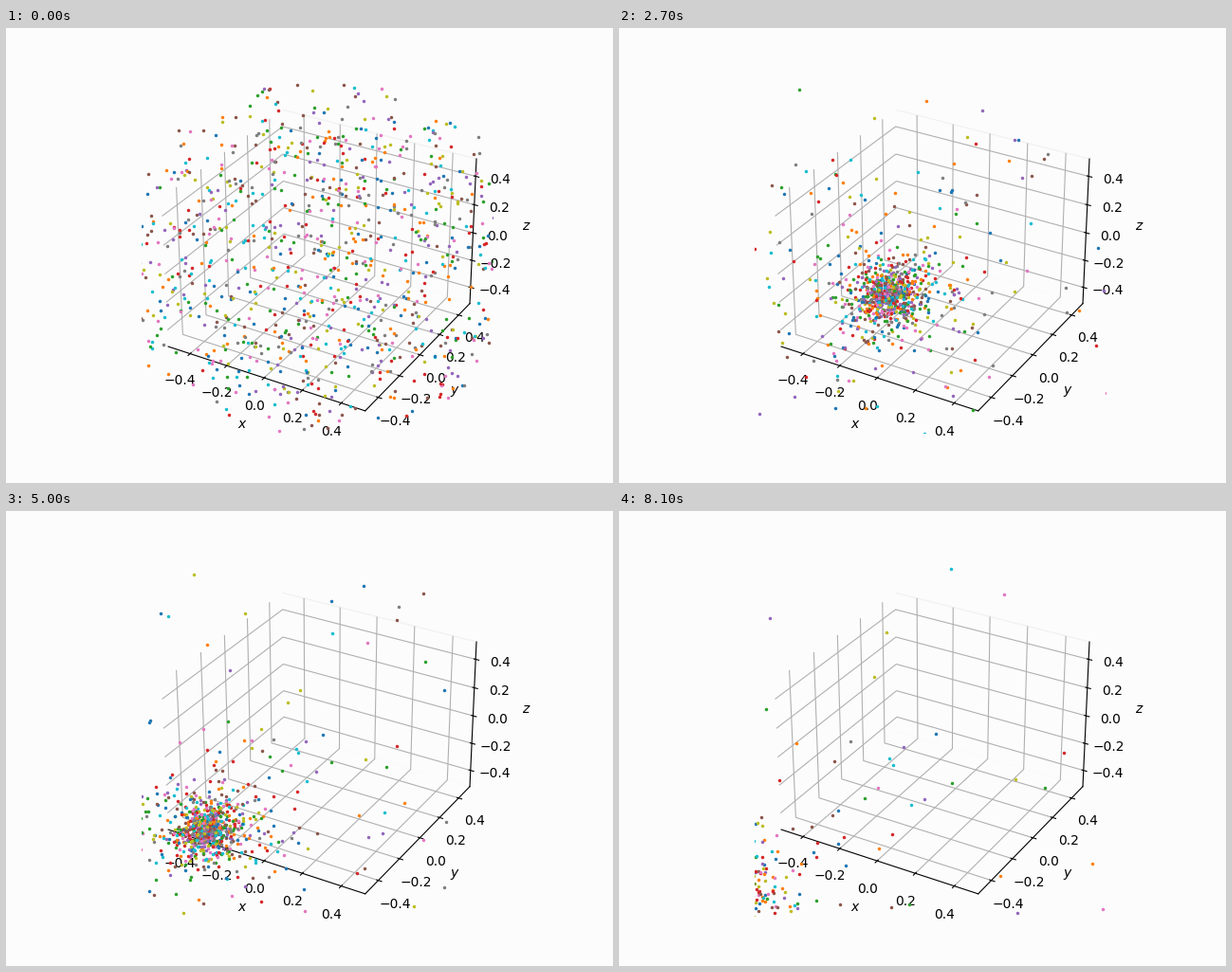
Write a matplotlib script that moves like this. It is 640 px wide and 480 px high and loops after 8.2 s.

```python
import numpy as np
import matplotlib.pyplot as plt
from matplotlib.animation import FuncAnimation

FRAMES, INTERVAL = 82, 100
COUNT, EJECTED, CLUMPS = 1000, 250, 70
BACKGROUND = "#fcfcfc"
LIMIT = 25 / 48

COLLAPSE_TIME = 1.15          # seconds until the cloud has fallen in
CORE_RADIUS = 0.11
CORE_START = np.array([0, 0, -0.06])
CORE_DRIFT = np.array([-0.11, -0.09, -0.14])
DENSE_SIDE = np.array([0.35, 0.3, 0.15])

rng = np.random.default_rng(12)


def directions(n):
    v = rng.normal(size=(n, 3))
    return v / np.linalg.norm(v, axis=1, keepdims=True)


def ball(n):
    return directions(n) * np.cbrt(rng.random((n, 1)))


# Cold, uniform cloud whose parts fall towards clumps of uneven strength
start = ball(COUNT)
clumps = ball(CLUMPS) * 0.95
pull = rng.uniform(0.6, 1.4, CLUMPS)
distance = np.linalg.norm(start[:, None] - clumps[None], axis=2) / pull
clump = clumps[distance.argmin(axis=1)]
grip = rng.uniform(0, 0.85, (COUNT, 1))
lean = np.exp(-2 * np.sum((start - DENSE_SIDE) ** 2, axis=1, keepdims=True))

# Bound stars circle the core, with a Plummer spread of radii
mass = rng.uniform(0.01, 0.985, (COUNT, 1))
radius = CORE_RADIUS / np.sqrt(mass ** (-2 / 3) - 1)
rate = (radius**2 + CORE_RADIUS**2) ** -0.75
axis_a, axis_b = directions(COUNT), directions(COUNT)
phase = rng.uniform(0, 2 * np.pi, (COUNT, 1))

# The others are flung out in straight lines
ejected = np.zeros((COUNT, 1), bool)
ejected[rng.choice(COUNT, EJECTED, replace=False)] = True
speed = 0.05 + 1.5 * rng.random((COUNT, 1)) ** 1.3
escape = directions(COUNT) * speed + 0.6 * CORE_DRIFT


def smoothstep(x):
    x = np.clip(x, 0, 1)
    return x * x * (3 - 2 * x)


def positions(t):
    shrink = max(0.0, 1 - (t / COLLAPSE_TIME) ** 2) ** (2 / 3)
    gather = min(1, t / 0.9) ** 3
    falling = start + gather * grip * (clump - start)
    falling = falling + 0.5 * gather * lean * (DENSE_SIDE - falling)
    falling = falling * shrink * (1 + 0.1 * gather)

    since = max(0.0, t - COLLAPSE_TIME)
    angle = rate * t + phase
    bound = radius * (axis_a * np.cos(angle) + axis_b * np.sin(angle))
    core = CORE_START + CORE_DRIFT * since
    after = np.where(ejected, escape * since, bound + core)

    mix = smoothstep((t - 0.9) / 0.4)
    return falling * (1 - mix) + after * mix


fig = plt.figure(figsize=(6.4, 4.8), dpi=100, facecolor=BACKGROUND)
ax = fig.add_subplot(projection="3d", facecolor=BACKGROUND)
ax.set(xlim=(-LIMIT, LIMIT), ylim=(-LIMIT, LIMIT), zlim=(-LIMIT, LIMIT),
       xlabel="$x$", ylabel="$y$", zlabel="$z$")
for axis in (ax.xaxis, ax.yaxis, ax.zaxis):
    axis.set_pane_color(BACKGROUND)
ax.yaxis.pane.set_edgecolor("#f2f2f2")

# Several layers per colour, so that no colour always lies on top
LAYER = 200
groups = []
for first in range(0, COUNT, LAYER):
    for c in range(10):
        members = slice(first + c, first + LAYER, 10)
        line, = ax.plot([], [], [], ".", ms=3, color=f"C{c}")
        groups.append((line, members))


def update(frame):
    points = positions(frame * INTERVAL / 1000)
    for line, members in groups:
        line.set_data_3d(*points[members].T)
    return [line for line, _ in groups]


anim = FuncAnimation(fig, update, frames=FRAMES, interval=INTERVAL,
                     repeat=True, repeat_delay=0, blit=False)
plt.show()
```
